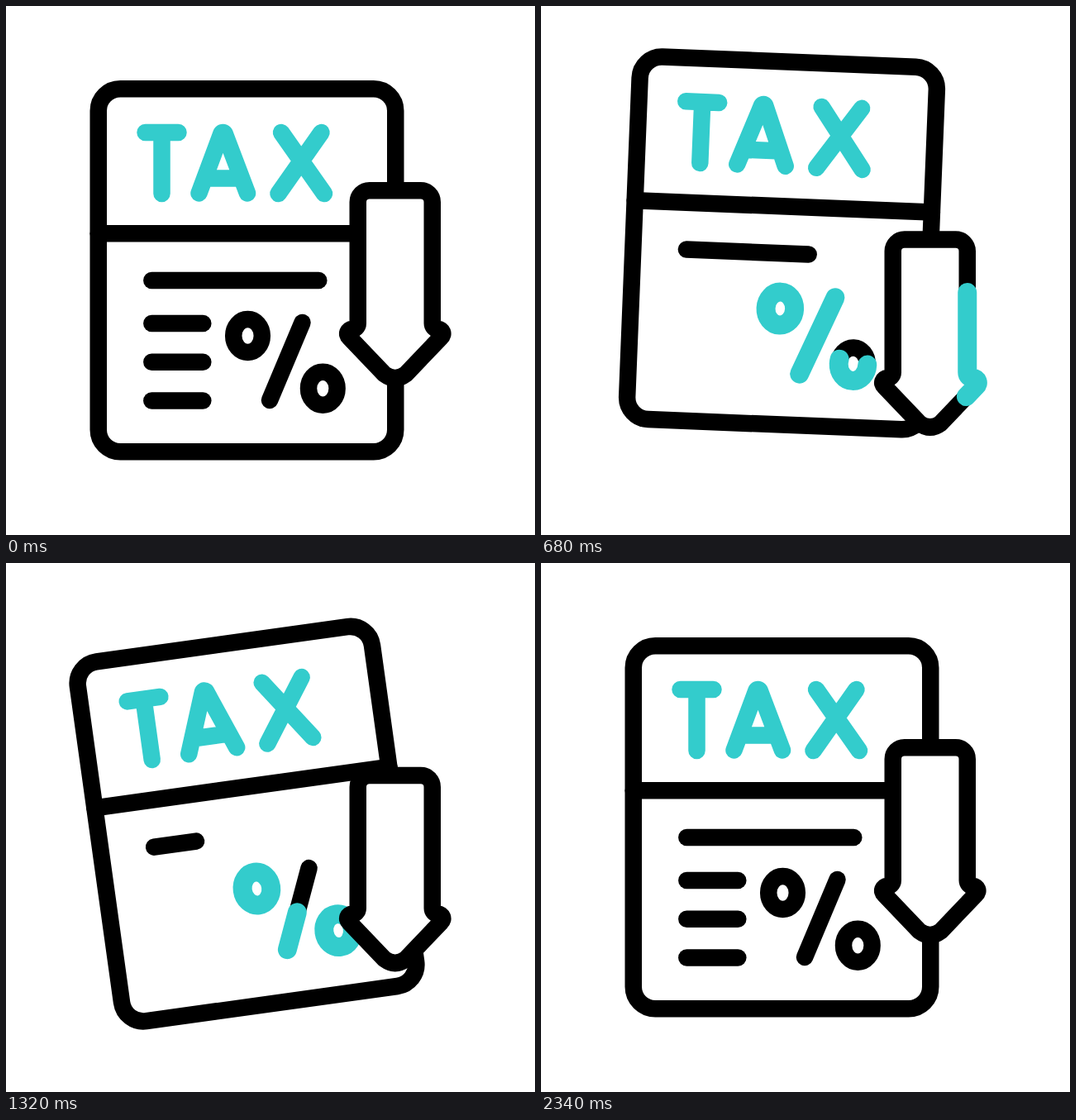
Write an HTML page that moves like this. It is 640x640 px and loops after 2400 ms.

```html
<!DOCTYPE html>
<html lang="en">
<head>
<meta charset="utf-8">
<title>Tax reduction</title>
<style>
  html, body { margin: 0; width: 100%; height: 100%; overflow: hidden; background: #fff; }
  svg { display: block; width: 100vw; height: 100vh; }
  .ink { fill: none; stroke: #000; stroke-width: 20.5; stroke-linecap: round; stroke-linejoin: round; }
  .teal { stroke: #3cc; }
  .glow { stroke: #3cc; stroke-width: 23; }
</style>
</head>
<body>
<svg viewBox="0 0 640 640">
  <g id="doc" class="ink">
    <rect x="111.75" y="100.25" width="359.5" height="439" rx="26.5"/>
    <path d="M111.75 275.25H471.25"/>
    <g class="teal">
      <path d="M168.5 153H208.5M188.5 153V227"/>
      <path d="M233.5 226.5L260.5 154Q262.5 152 264.5 154L292 226.5M246 208.5H280"/>
      <path d="M333 153L385 227M381.5 153L329.5 227"/>
    </g>
    <g id="rows"></g>
    <g id="percent"></g>
  </g>
  <g id="arrow" class="ink"></g>
</svg>
<script>
const LOOP = 2400;
const $ = id => document.getElementById(id);

function add(parent, tag, attrs) {
  const el = document.createElementNS('http://www.w3.org/2000/svg', tag);
  for (const k in attrs) el.setAttribute(k, attrs[k]);
  return parent.appendChild(el);
}

const clamp = u => Math.min(1, Math.max(0, u));
const smooth = u => u * u * (3 - 2 * u);

// Horizontal-tangent cubic easing with handle positions p and q
function ease(u, p, q) {
  let lo = 0, hi = 1;
  for (let i = 0; i < 24; i++) {
    const m = (lo + hi) / 2, n = 1 - m;
    const x = 3 * n * n * m * p + 3 * n * m * m * q + m * m * m;
    if (x < u) lo = m; else hi = m;
  }
  return smooth(lo);
}

const ramp = (t, start, span, q = 2 / 3) => ease(clamp((t - start) / span), 1 / 3, q);

// Eased value through [time, value] keys
function track(keys, t) {
  for (let i = 1; i < keys.length; i++) {
    const [t0, a] = keys[i - 1], [t1, b] = keys[i];
    if (t < t1) return a + (b - a) * smooth((t - t0) / (t1 - t0));
  }
  return keys[keys.length - 1][1];
}

const TILT = [[0, 0], [433, -18], [872, 16], [1300, -8], [1717, 4], [2050, 0]];
const LIFT = [[0, 0], [357, 54], [714, -35], [1071, 53], [1429, -20], [1786, 15], [2143, 0]];
const DROP = [[0, 0], [288, -138], [620, 69], [996, -69], [1310, 34], [1575, -17], [1920, 0]];

// A dark path with a teal stroke that can run along it
function runner(parent, d, fill) {
  add(parent, 'path', { d, fill });
  const el = add(parent, 'path', { d, class: 'glow' });
  const len = el.getTotalLength();
  return (from, to) => {
    const part = (to - from) * len;
    el.style.visibility = part > 0.3 ? 'visible' : 'hidden';
    el.setAttribute('stroke-dasharray', part.toFixed(2) + ' 4000');
    el.setAttribute('stroke-dashoffset', (-from * len).toFixed(2));
  };
}

const ring = (x, y) => `M${x + 17.3} ${y}a17.3 20 0 1 1 -34.6 0a17.3 20 0 1 1 34.6 0`;

const signs = ['M358.5 383L319 477', ring(292.5, 399), ring(383.3, 462.7)]
  .map(d => runner($('percent'), d, 'none'));

const arrowRun = runner($('arrow'),
  'M515.75 237.25A14 14 0 0 0 501.75 223.25H439.75A14 14 0 0 0 425.75 237.25' +
  'V384A7 7 0 0 1 418.5 391A5.5 5.5 0 0 0 415 400.6L458 445.6' +
  'Q470.75 455 483.5 445.6L526.5 400.6A5.5 5.5 0 0 0 523 391A7 7 0 0 1 515.75 384Z', '#fff');

const rows = [[332, 202], [384, 62], [430.7, 62], [477.5, 62]].map(([y, len]) =>
  ({ len, el: add($('rows'), 'path', { d: `M176.3 ${y}h${len}` }), y }));
const total = rows.reduce((sum, r) => sum + r.len, 0);

function drawRows(t) {
  const half = 1170;
  const u = t < half ? t / half : (t - half) / half;
  const e = ease(clamp(u), 0.7, 0.33);
  let left = total * (1 - 0.879 * (t < half ? e : 1 - e));
  for (const r of rows) {
    const w = Math.min(r.len, left);
    r.el.style.visibility = w > 0.05 ? 'visible' : 'hidden';
    r.el.setAttribute('d', `M176.3 ${r.y}h${Math.max(w, 0).toFixed(2)}`);
    left -= w;
  }
}

function draw(t) {
  const tilt = track(TILT, t).toFixed(3), lift = track(LIFT, t).toFixed(2);
  $('doc').setAttribute('transform', `translate(0 ${lift}) rotate(${tilt} 291.5 319.75)`);
  $('arrow').setAttribute('transform', `translate(0 ${track(DROP, t).toFixed(2)})`);
  arrowRun(ramp(t, 379, 551, 0.49), ramp(t, 0, 900, 0.49));
  signs.forEach((run, i) => {
    const start = 35 + 217 * i;
    run(ramp(t, start + 1074, 400), ramp(t, start, 400));
  });
  drawRows(t);
}

const begin = performance.now();
function tick() {
  draw((performance.now() - begin) % LOOP);
  requestAnimationFrame(tick);
}
tick();
</script>
</body>
</html>
```
